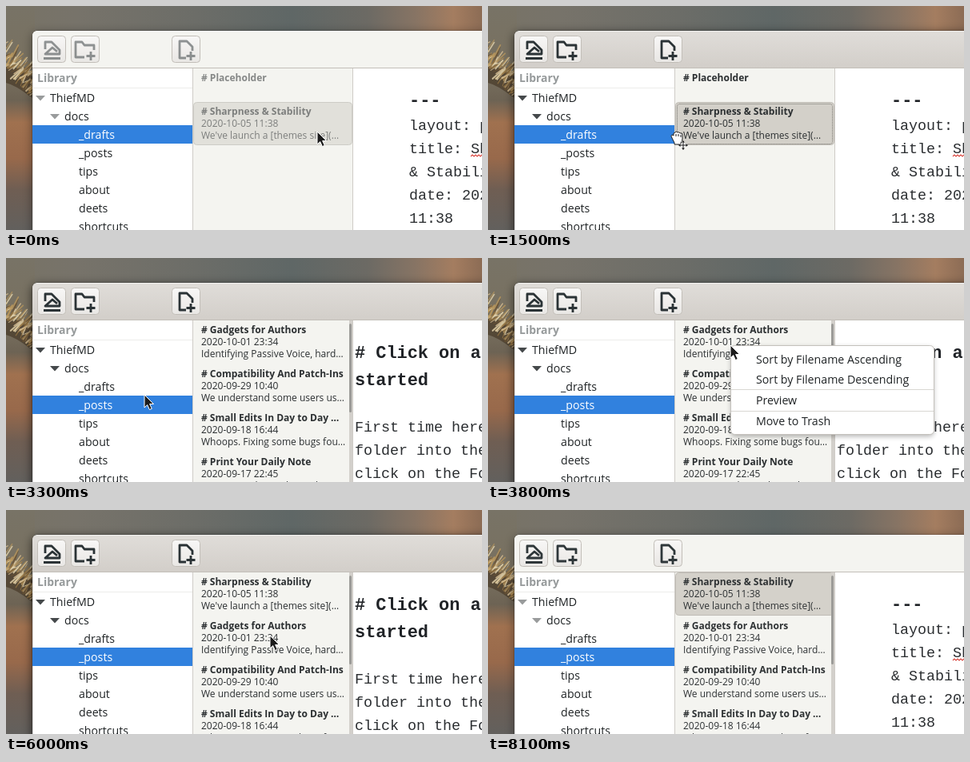
These frames come from a looping animation (595 px wide and 280 px high, 8.2 s). An HTML page:

```html
<!DOCTYPE html>
<html lang="en">
<head>
<meta charset="utf-8">
<title>Sorting posts</title>
<style>
  html, body { margin: 0; width: 100%; height: 100%; overflow: hidden; background: #777266; }
  svg { display: block; width: 595px; height: 280px; }
  text { font-family: "Open Sans", "Noto Sans", sans-serif; white-space: pre; }
  .ui { font-size: 14.2px; fill: #1f2325; }
  .list { font-size: 12px; fill: #2b2f31; }
  .bold { font-weight: 700; }
  .mono { font-family: "Liberation Mono", "Noto Sans Mono", monospace; font-size: 18.35px; fill: #2b2e31; }
  .head { font-size: 21.9px; font-weight: 700; fill: #202327; }
  .icon { fill: none; stroke: #2b3336; stroke-width: 2.8; stroke-linejoin: round; }
</style>
</head>
<body>
<svg viewBox="0 0 595 280">
  <defs>
    <linearGradient id="sky">
      <stop offset="0" stop-color="#787366"/>
      <stop offset=".15" stop-color="#77736a"/>
      <stop offset=".4" stop-color="#6c6d68"/>
      <stop offset=".6" stop-color="#5f6766"/>
      <stop offset=".76" stop-color="#6c6a64"/>
      <stop offset=".86" stop-color="#877464"/>
      <stop offset=".94" stop-color="#a47d60"/>
      <stop offset="1" stop-color="#8c6c55"/>
    </linearGradient>
    <linearGradient id="side" x2="0" y2="1">
      <stop offset="0" stop-color="#787366"/>
      <stop offset=".3" stop-color="#78705f"/>
      <stop offset=".42" stop-color="#6d6354"/>
      <stop offset=".52" stop-color="#a0714f"/>
      <stop offset=".68" stop-color="#98694b"/>
      <stop offset=".82" stop-color="#6f5e53"/>
      <stop offset="1" stop-color="#62605d"/>
    </linearGradient>
    <linearGradient id="bar" x2="0" y2="1">
      <stop offset="0" stop-color="#e0ddd9"/>
      <stop offset="1" stop-color="#d2cec9"/>
    </linearGradient>
    <linearGradient id="btn" x2="0" y2="1">
      <stop offset="0" stop-color="#f8f7f6"/>
      <stop offset="1" stop-color="#e9e7e4"/>
    </linearGradient>
    <filter id="blur" x="-20%" y="-20%" width="140%" height="140%"><feGaussianBlur stdDeviation="6"/></filter>
    <filter id="soft" x="-20%" y="-20%" width="140%" height="140%"><feGaussianBlur stdDeviation="3"/></filter>
  </defs>

  <rect width="595" height="280" fill="url(#sky)"/>
  <rect width="36" height="280" fill="url(#side)"/>
  <g id="wheat" fill="none" stroke-linecap="round"></g>

  <rect id="shadow" x="32" y="33" width="640" height="320" rx="8" fill="#000" filter="url(#blur)"/>
  <path d="M33 290V38q0-7 7-7H600V290Z" fill="#fff" stroke="#000" stroke-opacity=".28"/>
  <path d="M33 78V38q0-7 7-7H600V78Z" fill="url(#bar)"/>
  <path id="pale" d="M33 78V38q0-7 7-7H600V78Z" fill="#f4f4f0"/>
  <path d="M38 31.5H595" stroke="#fff" stroke-opacity=".6"/>
  <path d="M33 77.5H595" stroke="#c3bfb9"/>

  <g id="buttons" fill="url(#btn)" stroke="#c2beb8">
    <rect x="39.5" y="37.5" width="35" height="33" rx="4"/>
    <rect x="81.5" y="37.5" width="35" height="33" rx="4"/>
    <rect x="207.5" y="37.5" width="35" height="33" rx="4"/>
  </g>
  <g id="icons" class="icon">
    <path d="M49 54V45h8L67 55v5H49l9-8 6 5M47 65.5H68"/>
    <path d="M98 64H87V45h8l3 4h12v6M106 57v11M100.5 62.5h11"/>
    <path d="M225 65H217V44h9l7 7v5M231 57v11M225.5 62.5h11"/>
  </g>

  <rect x="234" y="78" width="199" height="202" fill="#f4f4f0"/>
  <path d="M233.5 78V280M433.5 78V280" stroke="#cfccc7"/>
  <path d="M33 102.5H233" stroke="#ececea"/>
  <text x="39" y="95" class="bold" font-size="14" fill="#969a9b">Library</text>
  <rect id="row" x="33" width="200" height="23" fill="#3181de"/>
  <g id="arrows" fill="#45494b"><path d="M37 112h12l-6 6.5ZM55 135h12l-6 6.5Z"/></g>
  <g id="tree"></g>

  <g id="cards"></g>
  <g id="scroll">
    <rect x="429" y="78" width="4" height="202" fill="#d3d0cb"/>
    <rect x="429" y="82" width="3" height="111" rx="1.5" fill="#9c9b98"/>
  </g>

  <g id="post"></g>
  <g id="intro"></g>
  <g id="menu"></g>

  <path id="arrow" d="M0 0V16l3.7-3.4 2.7 6 2.9-1.3-2.7-5.8H11.5Z" fill="#1c1c1c" stroke="#fff" stroke-width="1"/>
  <g id="hand">
    <path d="M-7-1q-2-3 0-4l2 1q-1-4 2-4 1-2 3 0 2-1 3 1 3-1 3 2v5q0 3-2 5v2h-8v-2Z" fill="#fff" stroke="#1c1c1c"/>
    <path d="M-2-6v3M1-6v3M4-5v3" stroke="#1c1c1c" fill="none"/>
    <path d="M7 3v10M2 8h10" stroke="#fff" stroke-width="3.5"/>
    <path d="M7 4v8M3 8h8" stroke="#1c1c1c"/>
    <path d="M7 2l2 2.5h-4ZM7 14l2-2.5h-4ZM1 8l2.5-2v4ZM13 8l-2.5-2v4Z" fill="#1c1c1c"/>
  </g>
</svg>

<script>
const LOOP = 8200, STEP = 100;
const $ = id => document.getElementById(id);
const set = (el, attrs) => { for (const k in attrs) el.setAttribute(k, attrs[k]); };
const show = (el, on) => el.setAttribute('visibility', on ? 'visible' : 'hidden');

function add(parent, tag, attrs, content) {
  const el = document.createElementNS('http://www.w3.org/2000/svg', tag);
  set(el, attrs);
  if (content) el.textContent = content;
  parent.append(el);
  return el;
}
const write = (parent, cls, x, y, str) => add(parent, 'text', { class: cls, x, y }, str);

// Ear of grass at the left edge
let seed = 7;
const rand = () => (seed = seed * 16807 % 2147483647) / 2147483647;
const hues = ['#d9c193', '#b8965c', '#6a5334', '#e6d6ae', '#937444'];
add($('wheat'), 'path', { d: 'M-4 84Q14 86 36 104', stroke: '#4d3f2e', 'stroke-width': 22, opacity: .8 });
for (let i = 0; i < 80; i++) {
  const x = rand() * 38 - 6, y = 54 + x * .9 + rand() * 32;
  add($('wheat'), 'path', {
    d: `M${x} ${y}l${5 + rand() * 8} ${-3 - rand() * 13}`,
    stroke: hues[i % 5], 'stroke-width': .8 + rand() * 1.5, opacity: .8
  });
}

// Folder tree
const folders = [['ThiefMD', 55], ['docs', 73], ['_drafts', 91], ['_posts', 91],
  ['tips', 91], ['about', 91], ['deets', 91], ['shortcuts', 91]];
const rows = folders.map(([name, x], i) => write($('tree'), 'ui', x, 120 + 23 * i, name));

// Note list
const news = ['Sharpness & Stability', '2020-10-05 11:38', "We've launch a [themes site](…"];
const older = [
  ['Gadgets for Authors', '2020-10-01 23:34', 'Identifying Passive Voice, hard…'],
  ['Compatibility And Patch-Ins', '2020-09-29 10:40', 'We understand some users us…'],
  ['Small Edits In Day to Day …', '2020-09-18 16:44', 'Whoops. Fixing some bugs fou…'],
  ['Print Your Daily Note', '2020-09-17 22:45', "It's time to show others wh…"]
];
const card = add($('cards'), 'rect', { x: 234.5, width: 198, height: 53, rx: 4 });
const dots = add($('cards'), 'rect', {
  x: 236.5, width: 194, height: 50, rx: 3, fill: 'none', stroke: '#77746f', 'stroke-dasharray': '1 1'
});

function list(notes, top = 94) {
  const g = add($('cards'), 'g', {});
  notes.forEach(([title, date, text], i) => {
    const y = top + 55 * i;
    write(g, 'list bold', 244, y, '# ' + title);
    write(g, 'list', 244, y + 15, date || '');
    write(g, 'list', 244, y + 30, text || '');
  });
  return g;
}
const stub = list([['Placeholder']]);
const draft = list([news], 136);
const unsorted = list(older);
const sorted = list([news, ...older]);

// Editor pages
const post = $('post'), intro = $('intro');
write(post, 'mono head', 504, 124, '---');
['layout: post', 'title: Sharpness', '& Stability', 'date: 2020-10-05', '11:38']
  .forEach((s, i) => write(post, 'mono', 504, 155 + 29 * i, s));
add(post, 'path', {
  d: 'M581 188' + 'l2-2l2 2'.repeat(4), fill: 'none', stroke: '#d8433c', 'stroke-width': 1.1
});
['# Click on a file', 'started'].forEach((s, i) => write(intro, 'mono head', 436, 125 + 34 * i, s));
['First time here?', 'folder into the', 'click on the Folder']
  .forEach((s, i) => write(intro, 'mono', 436, 217 + 29 * i, s));

// Context menu
const menu = $('menu');
add(menu, 'rect', { x: 1, y: 3, width: 253, height: 111, rx: 5, opacity: .3, filter: 'url(#soft)' });
add(menu, 'rect', { x: .5, y: .5, width: 254, height: 111, rx: 5, fill: '#fff', stroke: '#c4c1bc' });
add(menu, 'path', { d: 'M1 55.5H254M1 82.5H254', stroke: '#d9d7d3' });
const hot = add(menu, 'rect', { x: 1, y: 31, width: 253, height: 24, fill: '#3181de' });
const items = ['Sort by Filename Ascending', 'Sort by Filename Descending', 'Preview', 'Move to Trash']
  .map((s, i) => write(menu, 'ui', 32, [23, 48, 74, 100][i], s));

// Pointer: time, x, y
const path = [
  [0, 389, 157], [300, 400, 159], [600, 400, 160], [1500, 237, 166], [1900, 141, 186],
  [3200, 141, 186], [3700, 303, 109], [3800, 303, 109], [4000, 330, 150], [4100, 328, 150],
  [4300, 314, 143], [5200, 314, 143], [5500, 303, 116], [5600, 303, 116], [5900, 330, 157],
  [6100, 330, 157], [6500, 312, 108], [7000, 312, 106], [7100, 310, 106], [7200, 310, 106],
  [7400, 332, 119], [7500, 240, 76], [7600, 60, 2], [LOOP, 60, 2]
];
function place(t) {
  const i = path.findIndex(p => p[0] > t);
  const [t0, x0, y0] = path[i - 1], [t1, x1, y1] = path[i];
  const k = (t - t0) / (t1 - t0);
  return [x0 + (x1 - x0) * k, y0 + (y1 - y0) * k];
}
const mix = (a, b, k) => `rgb(${a.map((v, i) => Math.round(v + (b[i] - v) * k))})`;

// How far the frame and the text have faded into the unfocused look
function fade(t) {
  if (t < 600) return [1, 1];
  if (t < 700) return [.6, .7];
  if (t < 800) return [.2, .3];
  if (t < 8000) return [0, 0];
  return t < 8100 ? [.5, 0] : [1, .05];
}

function draw(now) {
  const t = Math.floor(now % LOOP / STEP) * STEP;
  const [frame, ink] = fade(t);
  const within = (a, b) => t >= a && t < b;

  $('pale').setAttribute('opacity', frame);
  $('shadow').setAttribute('opacity', .55 - .2 * frame);
  $('arrows').setAttribute('opacity', 1 - .45 * frame);
  $('icons').setAttribute('opacity', 1 - .5 * ink);
  [stub, draft, sorted].forEach(g => g.setAttribute('opacity', 1 - .45 * ink));

  const pick = t < 3000 ? 2 : 3;
  $('row').setAttribute('y', 103 + 23 * pick);
  rows.forEach((r, i) => { r.style.fill = i === pick ? '#fff' : ''; });

  const opened = t >= 6600, before = t < 2300;
  show(stub, t < 3000);
  show(draft, before);
  show(unsorted, within(3000, 4100));
  show(sorted, t >= 4100);
  show($('scroll'), t >= 3300);
  show(post, before || opened);
  show(intro, !before && !opened);

  const top = before ? 121 : 79;
  set(card, {
    y: top - .5,
    fill: mix([211, 208, 201], [225, 224, 218], ink),
    stroke: mix([190, 187, 180], [205, 204, 198], ink)
  });
  dots.setAttribute('y', top + 1.5);
  show(card, before || opened);
  show(dots, (before || opened) && frame === 0);

  const first = within(3700, 4100), second = within(5500, 6000);
  const over = within(4000, 4100) || within(5800, 6000);
  show(menu, first || second);
  menu.setAttribute('transform', `translate(303 ${first ? 109 : 116})`);
  hot.setAttribute('opacity', over ? 1 : 0);
  items[1].style.fill = over ? '#fff' : '';

  const [x, y] = place(t), drag = within(800, 2300);
  const at = `translate(${Math.round(x)} ${Math.round(y)})`;
  $('arrow').setAttribute('transform', at);
  $('hand').setAttribute('transform', at);
  show($('arrow'), !drag && t < 7700);
  show($('hand'), drag);
}

const start = performance.now();
function tick() {
  draw(performance.now() - start);
  requestAnimationFrame(tick);
}
tick();
</script>
</body>
</html>
```
